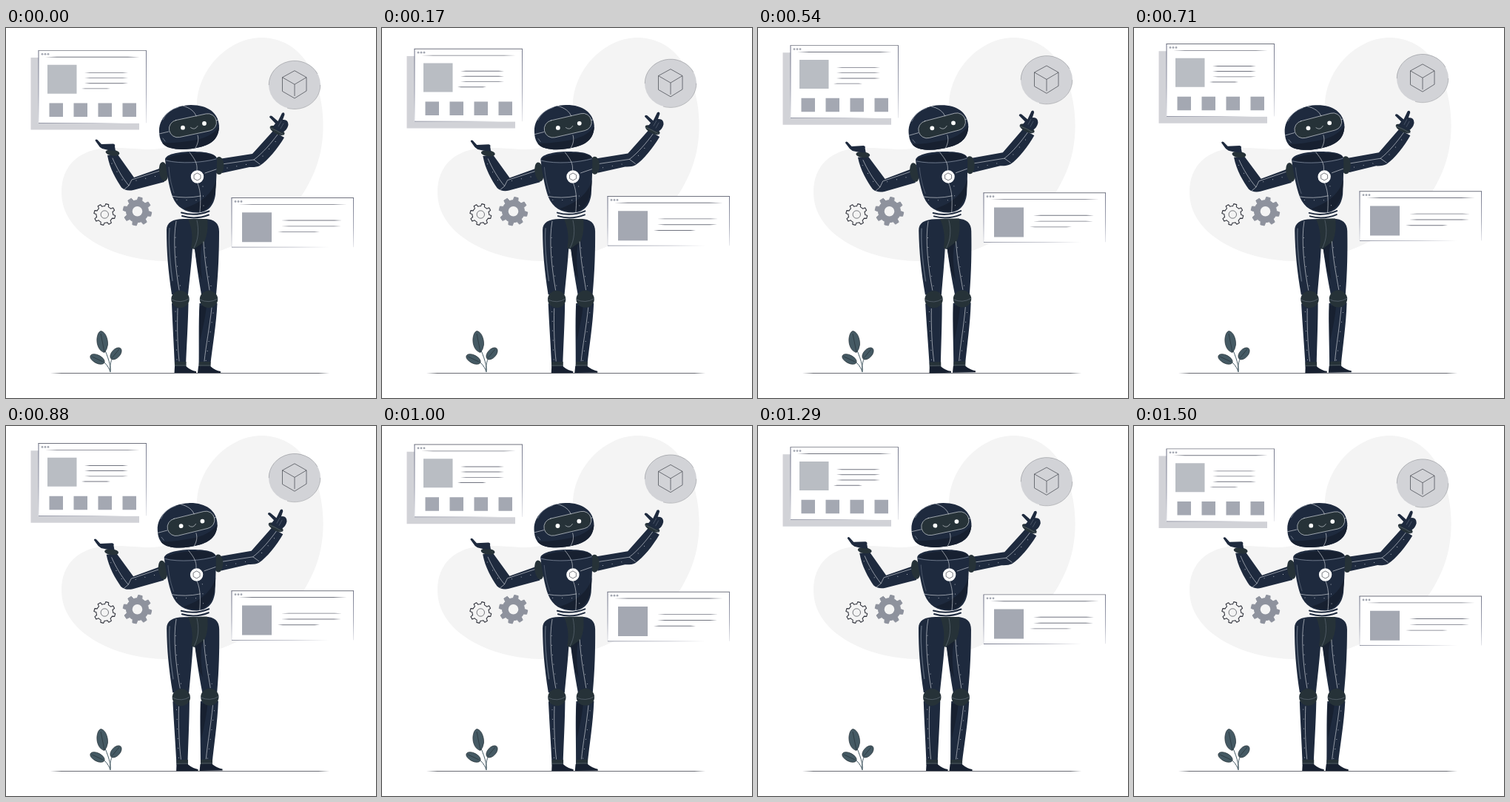
An HTML page that plays this animation: 500x500 px, repeating every 1540 ms.

```html
<!DOCTYPE html>
<html lang="en">
<head>
<meta charset="utf-8">
<title>Robot with floating windows</title>
<style>
  html, body { margin: 0; width: 100%; height: 100%; overflow: hidden; background: #fff; }
  svg { display: block; width: 100vw; height: 100vh; }
  .navy { fill: #1e2a3e; }
  .joint { fill: #263238; }
  .shade { fill: #172030; }
  .seam { fill: none; stroke: #dfe3e8; stroke-width: .6; stroke-linecap: round; }
  .faint { fill: none; stroke: #8b95a5; stroke-width: .7; stroke-linecap: round; }
  .rivets { fill: none; stroke: #dde1e8; stroke-width: 1; stroke-linecap: round; stroke-dasharray: 0 13; }
  .band { fill: none; stroke: #1e2a3e; stroke-width: 2; stroke-linecap: round; }
  .ink { fill: none; stroke: #34363f; stroke-width: .65; stroke-linejoin: round; }
  .rule { fill: #70737f; }
  .grey { fill: #a4a8b2; }
  .leaf { fill: #455a64; stroke: #263238; stroke-width: .7; }
</style>
</head>
<body>
<svg viewBox="0 0 500 500">
  <defs>
    <linearGradient id="fadeX"><stop stop-color="#777b8e"/><stop offset=".5" stop-color="#b5b7c2"/><stop offset=".8" stop-color="#fff"/></linearGradient>
    <linearGradient id="fadeY" x2="0" y2="1"><stop stop-color="#666a80"/><stop offset=".6" stop-color="#9b9eae"/><stop offset="1" stop-color="#e4e5ea"/></linearGradient>
  </defs>

  <path fill="#f4f4f4" d="M345 13C382 13 407 38 418 70C433 112 432 160 416 196C401 230 382 255 340 277C309 295 265 315 215 315C148 314 75 280 75 222C75 185 100 163 140 162C175 161 197 168 221 160C250 150 258 130 258 100C262 50 305 13 345 13Z"/>

  <g id="gears"></g>

  <g fill="none" stroke="#455a64" stroke-width="1">
    <path d="M141 465C142 452 135 440 130 425M141 465C138 455 131 449 122 446M141 463C140 452 143 446 149 438"/>
    <path class="leaf" d="M128 409.500C134 410 138 420 137.500 428Q136.500 435 133 438.500C126 437 122 428 123 419Q124 411 128 409.500Z"/>
    <ellipse class="leaf" cx="123.500" cy="447.500" rx="10.500" ry="5.500" transform="rotate(27 123.500 447.500)"/>
    <ellipse class="leaf" cx="148.500" cy="440" rx="9.500" ry="5.700" transform="rotate(-48 148.500 440)"/>
    <path stroke="#263238" stroke-width=".7" d="M128 413L133 438M116 444L131 451M153 434L143 446"/>
  </g>
  <path fill="#6b6d74" d="M60 466.400L75 465.900H422L437 466.400L422 466.900H75Z"/>

  <g id="float">
    <path fill="#d1d2d7" d="M33.500 40H180V137.500H33.500Z"/>
    <g id="leftWindow"></g>
    <path fill="#b9bdc3" d="M56 49.700H95.500V88.700H56Z"/>
    <path class="grey" d="M58.500 101.500h18.500v18.500h-18.500zM91.500 101.500h18.500v18.500h-18.500zM124.500 101.500h18.500v18.500h-18.500zM157.500 101.500h18.500v18.500h-18.500z"/>
    <g id="rightWindow"></g>
    <path class="grey" d="M319 249.300h40v40h-40z"/>
    <ellipse cx="390" cy="76.800" rx="35" ry="32.600" fill="#d2d3d7"/>
    <path class="ink" opacity=".4" d="M355.200 77A34.800 32.400 0 0 1 421 62M424.800 77A34.800 32.400 0 0 1 380 108.200"/>
    <path class="ink" d="M390 57.700L406 66.700V85L390 95L373.500 85.500V66.700ZM373.500 66.700L390 76.200L406 66.700M390 76.200V92"/>
  </g>

  <g id="legs">
    <path class="navy" d="M224 372H246.500C246 400 244 430 243 457H228C227 430 225 400 224 372Z"/>
    <path class="navy" d="M261.500 372H285.500C284 402 279 430 276 457H260.500C261 430 260 400 261.500 372Z"/>
    <path class="shade" d="M262 375H271C270 388 266 405 262.500 422C261 405 261 390 262 375Z"/>
    <path class="navy" d="M217 273C217 263 225 258 240 258H268C282 258 288 264 288 275C288 302 287 330 284 360H264C260 337 257 317 255 298H252C250.500 320 248 340 246 360H224C219 327 217 302 217 273Z"/>
    <path class="joint" d="M246 258H272C274 274 270 291 262 297Q255 301 250 297C253 283 251 270 246 258Z"/>
    <path class="shade" d="M266 290C262 300 262 315 265 340L260 330L255 298Z"/>
    <path class="faint" opacity=".55" d="M258 260C261 273 260 286 254 297"/>
    <path class="seam" d="M230 261C225 285 229 325 234 354M267 289C268 313 272 334 275 354M232 379C231 405 232 432 234 450M278 378C275 405 270 430 268 450"/>
    <path fill="none" stroke="#5c6879" stroke-width="1.300" d="M221 270C219 292 222 320 225 342"/>
    <path class="rivets" d="M229 283C229 310 233 335 236 352M269 297C271 320 274 340 278 352M229 383L231 450M280 385L270 450"/>
    <g class="joint">
      <ellipse cx="235.500" cy="366.500" rx="12.200" ry="11.500"/>
      <ellipse cx="274" cy="366.500" rx="12.200" ry="11.500"/>
      <path d="M228 451H243.500V458H228ZM261 451H276.500V458H260.500Z"/>
    </g>
    <path class="faint" opacity=".6" d="M224 367Q236 373 247 366M262 367Q274 373 286 366"/>
    <path class="shade" d="M228 457H243Q250 463 257 464V466H227.500ZM260 457H276Q283 463 290 464V466H259Z"/>
    <path class="faint" opacity=".5" d="M228 456H243M261 456H276"/>
  </g>

  <g id="body">
    <path class="band" d="M237 249.500Q256 255 274.500 247.500M238 254Q256 259.500 274 252.500"/>

    <path class="navy" d="M213 188L173 202L151 171L137 172C140 190 149 205 156 215.500Q162 221 172 219L214 208Z"/>
    <path class="seam" d="M144 176C149 188 157 202 166 213L170 205L211 192M166 213L160 218"/>
    <path class="rivets" d="M143 183L159 208M176 206L209 199"/>
    <ellipse class="joint" cx="144" cy="168.500" rx="9.500" ry="4" transform="rotate(7 144 168.500)"/>
    <path class="navy" d="M138 165L130 163Q126 161 124 157L120.500 152Q121 149.500 123.500 151L129 157L145 156.500Q148 157 147 160L148 166Z"/>

    <path class="navy" d="M291 176.500L333 170L361 139L376 148C367 163 354 179 343 186Q338 188.500 329 188L292 196Z"/>
    <path class="seam" d="M292 184L335 178L343 184M335 178C347 169 358 156 367 144"/>
    <path class="rivets" d="M299 189L333 183M347 173L368 149"/>
    <ellipse class="joint" cx="366.500" cy="138.500" rx="11" ry="4.500" transform="rotate(28 366.500 138.500)"/>
    <path class="navy" d="M360 134L364 129L356 120.500Q356.500 117.500 359.500 119L367.500 126L373 115Q376.500 113 376.500 117L374 124Q381.500 123 381.500 131Q380 138 374 141Q366 139 360 134Z"/>
    <path class="faint" opacity=".55" d="M372 126L368 133M375 129L371 136M357 135Q366 138 376 145"/>

    <ellipse class="joint" cx="213" cy="194" rx="6" ry="13" transform="rotate(-8 213 194)"/>
    <ellipse class="joint" cx="288" cy="186" rx="6.500" ry="12"/>
    <path class="navy" d="M215 178C215 171 232 167 251 167C271 167 286 170 285 178C285 190 284 211 283 225C281 240 273 249.500 258 249.500C243 249.500 231 243 225 228C220 214 217 194 215 178Z"/>
    <path class="shade" d="M217 177C224 169 276 165 284 175C278 180 230 184 217 177ZM284 205C280 223 263 237 240 244C267 255 283 244 284 205Z"/>
    <path class="faint" d="M216 179C236 184 266 182 284 177"/>
    <path class="seam" d="M248 168C255 177 259 183 258 192M269 196L284 191M259 210C264 222 263 236 262 249M223 227Q243 231 263 227"/>
    <path class="faint" opacity=".6" d="M220 188C221 203 224 214 227 223"/>
    <path class="rivets" d="M231 232L262 233M266 214L267 240"/>
    <circle cx="258.500" cy="201" r="8.700" fill="#fff"/>
    <path class="ink" d="M258.500 196L263 198.500V203.500L258.500 206L254 203.500V198.500Z"/>

    <g id="head">
      <path class="navy" d="M207 139C207 118 227 104 250 104C273 104 287 115 288 132C288 148 279 157 262 161C248 164.500 232 165 222 162C211 159 207 151 207 139Z"/>
      <path class="shade" d="M288 134C287 149 279 157 262 161C248 164.500 232 165 222 162C217 161 213 158 211 155C225 156 238 154 252 152C267 150 280 144 288 134Z"/>
      <rect class="joint" x="220" y="120" width="65" height="23.500" rx="11.700" transform="rotate(-12 252.500 132)"/>
      <rect class="seam" x="220" y="120" width="65" height="23.500" rx="11.700" transform="rotate(-12 252.500 132)"/>
      <path class="seam" d="M239 105C249 108 255 113 257 119M259 145C261 151 259 157 256 162M207 143L220 140M284 125L288 124M249.500 134.500Q255 139 259 132.500"/>
      <path class="faint" d="M212 124Q218 111 233 107M212 149L215 153"/>
      <circle cx="239" cy="134.700" r="2.900" fill="#fff"/>
      <circle cx="268" cy="129" r="2.900" fill="#fff"/>
    </g>
  </g>
</svg>
<script>
const LOOP = 1540;
const byId = id => document.getElementById(id);

// Thin line with tapered ends
const rule = (x1, x2, y) => {
  const tip = (x2 - x1) / 8;
  const mid = x2 - x1 - 2 * tip;
  return `<path class="rule" d="M${x1} ${y}l${tip} -.45h${mid}l${tip} .45l${-tip} .45h${-mid}Z"/>`;
};

function browserWindow(x, y, w, h, lines) {
  const dots = [5, 9, 13].map(d => `<circle class="grey" cx="${x + d}" cy="${y + 4.9}" r="1.4"/>`).join("");
  return `<path fill="#fff" d="M${x} ${y}h${w}v${h}h${-w}z"/>
    <path fill="#70737f" d="M${x - .5} ${y - .5}h${w + 1}v.9h${-w - 1}z"/>
    <path fill="url(#fadeY)" d="M${x - .5} ${y}h1v${h}h-1zM${x + w - .5} ${y}h.9v${h}h-.9z"/>
    <path fill="url(#fadeX)" d="M${x} ${y + h - .5}h${w}v.8h${-w}z"/>` +
    dots + rule(x + 9, x + w - 9, y + 8.8) + lines.map(l => rule(...l)).join("");
}

function gear(cx, cy, root, tip, offset) {
  const points = [];
  for (let k = 0; k < 8; k++)
    for (const [turn, r] of [[-13, root], [-8, tip], [8, tip], [13, root], [22.5, root]]) {
      const a = (offset + k * 45 + turn) * Math.PI / 180;
      points.push(`${(cx + r * Math.cos(a)).toFixed(1)} ${(cy + r * Math.sin(a)).toFixed(1)}`);
    }
  return `M${points.join("L")}Z`;
}

byId("leftWindow").innerHTML = browserWindow(44, 30.4, 145.5, 98,
  [[106, 165, 60.4], [106, 165, 67.4], [106, 165, 74.7], [102, 141, 81.9]]);
byId("rightWindow").innerHTML = browserWindow(305, 229.6, 164.5, 66.7,
  [[372, 454, 260], [372, 453, 267.9], [367, 424, 275.6]]);
byId("gears").innerHTML =
  `<path fill="#8e929d" stroke="#8e929d" stroke-linejoin="round" d="${gear(177.5, 247.7, 15, 19.3, -78)}"/>
   <circle cx="177.5" cy="247.7" r="6.8" fill="#f4f4f4"/>
   <path class="ink" style="stroke-width:1.1" d="${gear(133.3, 252, 11.3, 14.5, -76)}"/>
   <circle class="ink" cx="133.3" cy="252" r="5.2"/>`;

// Linear back-and-forth between 0 and 1
const swing = (time, lead) => 1 - Math.abs(2 * ((time + lead) / LOOP % 1) - 1);
const move = (id, transform) => byId(id).setAttribute("transform", transform);

function draw(time) {
  const lift = swing(time, 55);
  const sway = swing(time, 155) - .2;
  move("float", `translate(0 ${.7 - 9.6 * lift})`);
  move("legs", `rotate(${-1.6 * sway} 252 262)`);
  move("body", `rotate(${-1.9 * sway} 255 262)`);
  move("head", `rotate(${-2 * sway} 252 164)`);
}

const start = performance.now();
function tick() {
  draw(performance.now() - start);
  requestAnimationFrame(tick);
}
tick();
</script>
</body>
</html>
```
